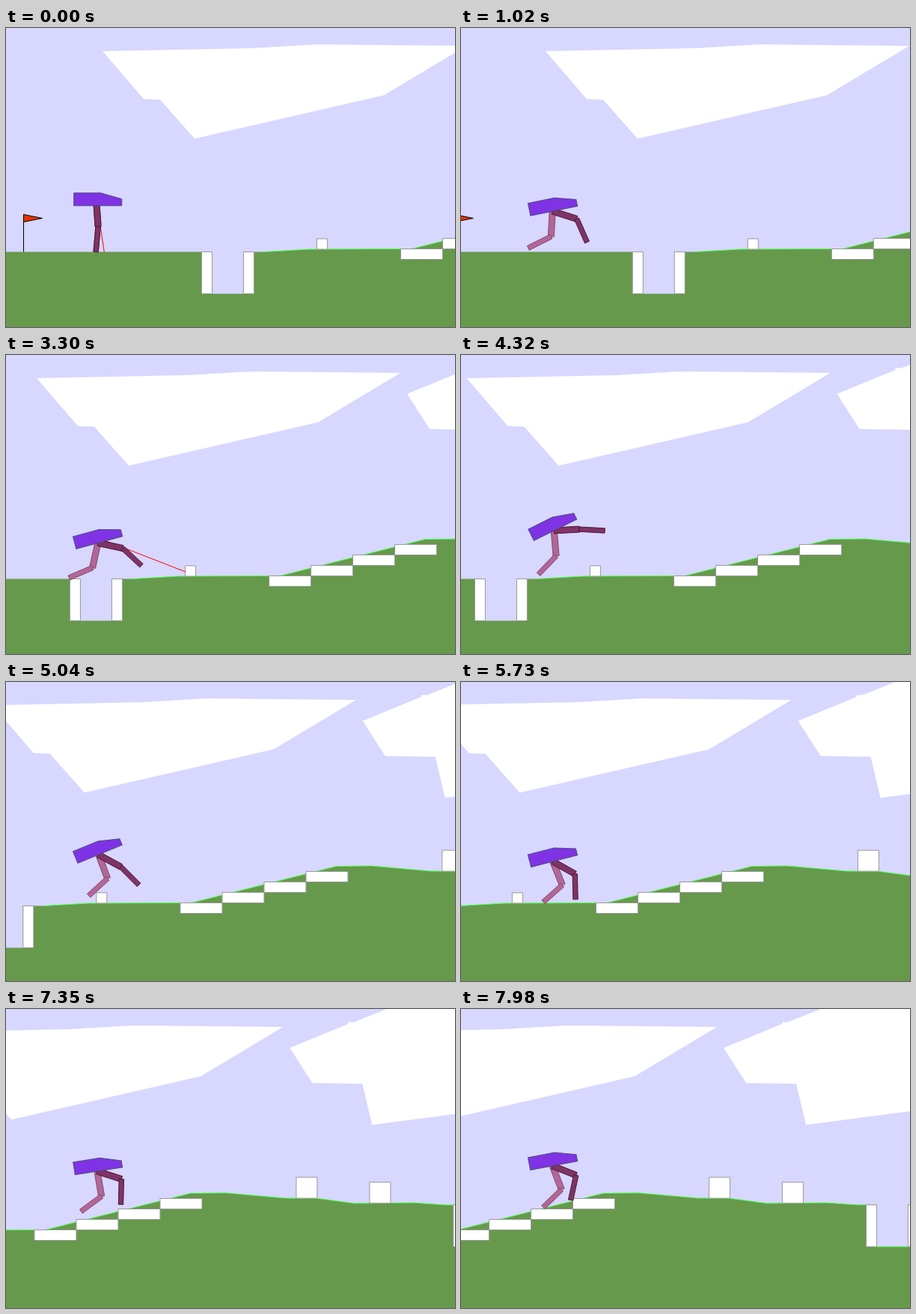
An HTML page with a canvas for the animation above (8000 ms loop, 600 by 400 pixels).

```html
<!DOCTYPE html>
<html>
<head>
<meta charset="utf-8">
<style>
html, body { margin: 0; height: 100%; overflow: hidden; background: #d7d7ff; }
canvas { display: block; }
</style>
</head>
<body>
<canvas id="stage" width="600" height="400"></canvas>
<script>
const ctx = document.getElementById('stage').getContext('2d');
const LOOP = 8000, STEP = 30, HULL_X = 120.7, LEG = 34, CELL = 14;
const SKY = '#d7d7ff', GRASS = '#66994c', EDGE = '#4cff4c';

const clouds = [
  [[129, 31], [330, 27], [415, 22], [615, 24], [505, 90], [252, 148], [206, 96], [184, 95]],
  [[624, 52], [702, 20], [702, 17.5], [710, 17.5], [756, -1], [1000, -1], [1000, 120],
   [734, 155], [721, 100], [654, 99]]
];
const surface = [[-20, 299.5], [345, 299.5], [405, 296], [542, 295.5], [736, 246.5], [783, 246],
  [862, 253], [905, 253.3], [955, 260], [1034, 259.2], [1076, 262], [1250, 262]];

// Milestones: time, distance scrolled, strides taken
const journey = [[0, 0, 0], [1950, 70, 2.556], [3300, 176, 4.403], [4320, 243, 5.681],
  [5730, 347, 8], [6660, 428, 9.306], [7980, 546, 11.083]];

const mix = (a, b, u) => a + (b - a) * u;
const rad = deg => deg * Math.PI / 180;
const cosDeg = deg => Math.cos(rad(deg));

function segmentAt(points, x) {
  let i = 0;
  while (i < points.length - 2 && points[i + 1][0] <= x) i++;
  return i;
}

function surfaceAt(x) {
  const i = segmentAt(surface, x), [x0, y0] = surface[i], [x1, y1] = surface[i + 1];
  return mix(y0, y1, (x - x0) / (x1 - x0));
}

// Obstacles sit on the cell grid.
const SMALL_BLOCK = 415.4;
const pits = [261.4, 1087.4];
const boxes = [];
const addBox = (x, y, w, h) => boxes.push([x, y, w, h]);
const addBlock = (x, size) => addBox(x, surfaceAt(x) - size, size, size);
addBlock(SMALL_BLOCK, CELL);
addBlock(877.4, 2 * CELL);
addBlock(975.4, 2 * CELL);
for (let k = 0; k < 4; k++) addBox(527.5 + 4 * CELL * k, 295.5 - CELL * k, 4 * CELL, CELL);
for (const x of pits)
  for (const wall of [x, x + 4 * CELL]) addBox(wall, surfaceAt(x), CELL, 4 * CELL);

const inPit = x => pits.some(p => x > p + CELL && x < p + 4 * CELL);
const solid = (px, py) => py >= surfaceAt(px) + (inPit(px) ? 4 * CELL : 0) ||
  boxes.some(([x, y, w, h]) => px >= x && px <= x + w && py >= y && py <= y + h);

// Feet skip the pits and step over the small block.
function footing(x) {
  const away = Math.abs(x - SMALL_BLOCK - CELL / 2) - CELL / 2;
  return surfaceAt(x) - CELL * Math.min(1, Math.max(0, 1 - away / 20));
}

// Smooth curve through one column of the milestones
function travelled(t, column) {
  const i = segmentAt(journey, t), a = journey[i], b = journey[i + 1];
  const slope = k => {
    const p = journey[Math.max(k - 1, 0)], q = journey[Math.min(k + 1, journey.length - 1)];
    return (q[column] - p[column]) / (q[0] - p[0]);
  };
  const dt = b[0] - a[0], u = (t - a[0]) / dt;
  return mix(a[column], b[column], u * u * (3 - 2 * u)) +
    dt * u * (1 - u) * (slope(i) * (1 - u) - slope(i + 1) * u);
}

// Angles in degrees: the far leg pushes off while the near leg kicks ahead.
const gait = p => ({
  tilt: 17.5 + 9 * cosDeg(p - 250),
  far: [7 + 19 * cosDeg(p + 8) - 4 * cosDeg(2 * p + 16),
        -52 + 9 * cosDeg(p - 320) + 6 * cosDeg(2 * p - 120)],
  near: [76 + 16 * cosDeg(p - 195) + 9 * cosDeg(2 * p - 90), 38 + 52 * cosDeg(p - 225)],
  clearance: 1.5 + 7 * Math.max(0, cosDeg(2 * p - 180))
});
const standing = [4, -5];

function legPoints(hip, [thigh, shin]) {
  const next = ([x, y], deg) => [x + LEG * Math.sin(rad(deg)), y + LEG * cosDeg(deg)];
  const knee = next(hip, thigh);
  return [hip, knee, next(knee, shin)];
}

function walkerAt(t) {
  const scroll = travelled(t, 1), pose = gait(360 * travelled(t, 2));
  const started = Math.min(1, t / 700), tilt = rad(pose.tilt * started);
  const hipDrop = mix(2, 8, Math.min(1, t / 120));
  const hip = [HULL_X + hipDrop * Math.sin(tilt), hipDrop * Math.cos(tilt)];
  const legs = [pose.far, pose.near].map(angles =>
    legPoints(hip, angles.map((deg, k) => mix(standing[k], deg, started))));
  const rest = legs.map(([, , [x, y]]) => footing(x + scroll) - y);
  return { scroll, tilt, legs, y: Math.min(...rest) - pose.clearance * started };
}

function polygon(points, fill, stroke) {
  ctx.beginPath();
  points.forEach(p => ctx.lineTo(...p));
  ctx.closePath();
  ctx.fillStyle = fill;
  ctx.fill();
  if (stroke) { ctx.strokeStyle = stroke; ctx.stroke(); }
}

function polyline(points, color) {
  ctx.beginPath();
  points.forEach(p => ctx.lineTo(...p));
  ctx.strokeStyle = color;
  ctx.stroke();
}

function limb([x0, y0], [x1, y1], width, ...paint) {
  const nx = (y1 - y0) / LEG * width / 2, ny = (x0 - x1) / LEG * width / 2;
  polygon([[x0 + nx, y0 + ny], [x1 + nx, y1 + ny], [x1 - nx, y1 - ny], [x0 - nx, y0 - ny]], ...paint);
}

function drawTerrain() {
  polygon([...surface, [1250, 401], [-20, 401]], GRASS);
  polyline(surface.slice(1), EDGE);
  for (const x of pits) {
    const y = surfaceAt(x);
    ctx.fillStyle = SKY;
    ctx.fillRect(x + CELL, y - 1, 3 * CELL, 4 * CELL + 1);
    if (x > surface[1][0])
      polyline([[x + CELL, y + 4 * CELL], [x + 4 * CELL, y + 4 * CELL]], EDGE);
  }
  for (const [x, y, w, h] of boxes)
    polygon([[x, y], [x + w, y], [x + w, y + h], [x, y + h]], '#fff', '#999');
}

// One sensor ray is shown at a time, sweeping out and back.
function drawRay(frame, x, y) {
  const i = (frame + 1) % 100;
  if (i >= 20) return;
  const angle = 0.15 * (i < 10 ? i : 19 - i);
  const dx = Math.sin(angle), dy = Math.cos(angle);
  let d = 0;
  while (d < 160 && !solid(x + dx * d, y + dy * d)) d += 0.5;
  polyline([[x, y], [x + dx * d, y + dy * d]], '#f00');
}

function drawWalker({ y, tilt, legs }) {
  const paints = [['#b26699', '#7f4c66'], ['#7f3366', '#4c1933']];
  ctx.save();
  ctx.translate(0, y);
  legs.forEach(([hip, knee, foot], k) => {
    limb(hip, knee, 8, ...paints[k]);
    limb(knee, foot, 6.4, ...paints[k]);
  });
  ctx.translate(HULL_X, 0);
  ctx.rotate(-tilt);
  polygon([[-30, -9], [6, -9], [34, -1], [34, 8], [-30, 8]], '#7f33e5', '#4c4c7f');
  ctx.restore();
}

function draw(now) {
  const frame = Math.floor(now % LOOP / STEP);
  const walker = walkerAt(frame * STEP), { scroll, y } = walker;
  ctx.fillStyle = SKY;
  ctx.fillRect(0, 0, 600, 400);

  ctx.save();
  ctx.translate(-scroll / 2, 0);
  clouds.forEach(c => polygon(c, '#fff'));
  ctx.restore();

  ctx.save();
  ctx.translate(-scroll, 0);
  drawTerrain();
  drawRay(frame, HULL_X + scroll, y);
  polyline([[23.5, 249], [23.5, 299.5]], '#000');
  polygon([[23.5, 249.5], [23.5, 259.5], [48.5, 254.5]], '#e63300', '#000');
  ctx.restore();

  drawWalker(walker);
}

const start = performance.now();
function tick() {
  draw(performance.now() - start);
  requestAnimationFrame(tick);
}
tick();
</script>
</body>
</html>
```
